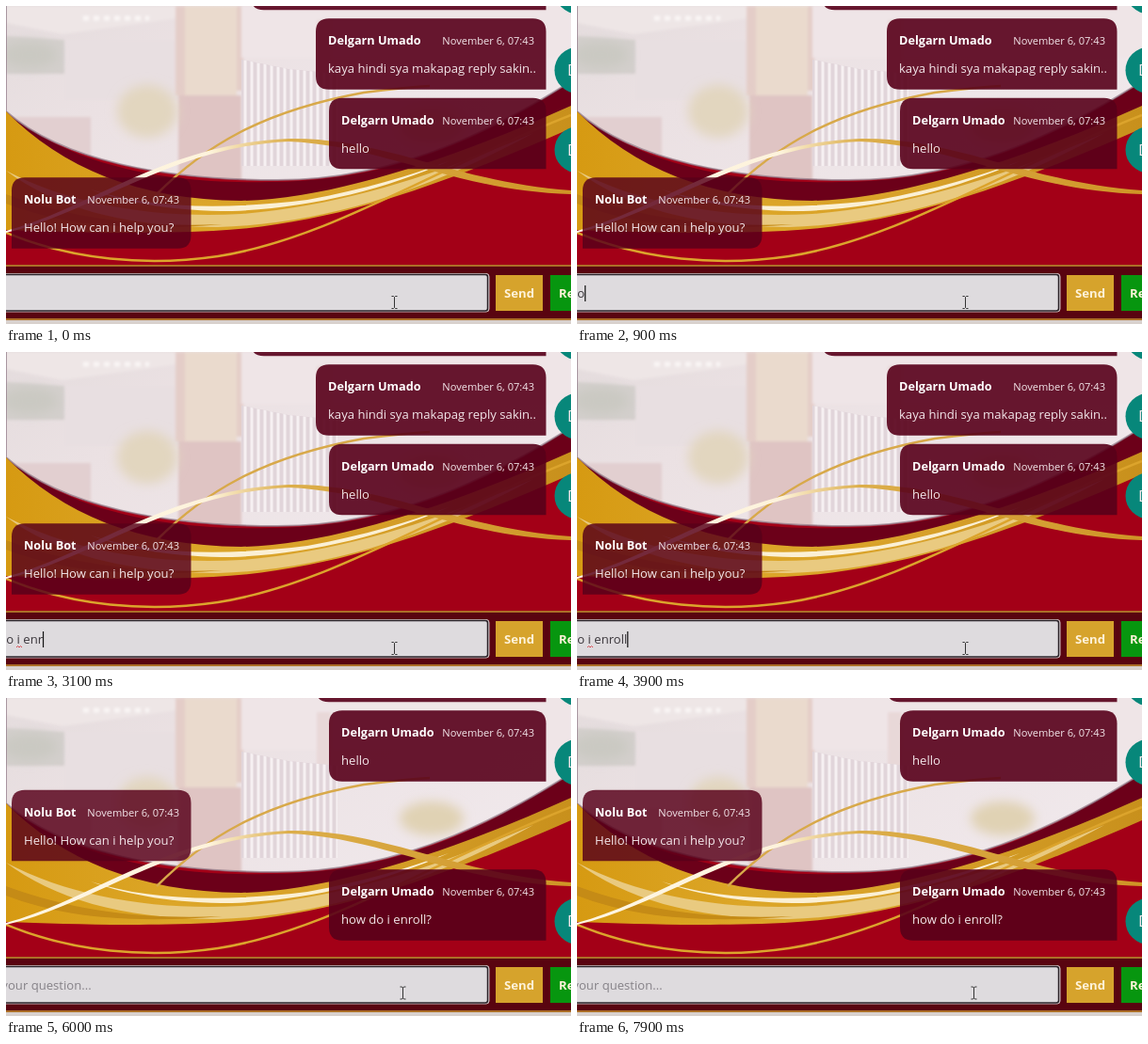
These frames come from a looping animation (600 px wide and 338 px high, 8 s). An HTML page:

```html
<!DOCTYPE html>
<html lang="en">
<head>
<meta charset="utf-8">
<title>Chat</title>
<style>
html, body { margin: 0; width: 100%; height: 100%; overflow: hidden; }
svg { display: block; width: 600px; height: 338px; }
text { font: 13.1px "Open Sans", "Noto Sans", sans-serif; white-space: pre; }
#chat text { fill: #f3e6ea; }
#chat .name { font-size: 12.7px; font-weight: 700; fill: #fff; }
#chat .date { font-size: 11.1px; text-anchor: end; }
.button { font-size: 13.2px; font-weight: 700; fill: #fff3da; }
</style>
</head>
<body>
<svg viewBox="0 0 600 338">
  <defs>
    <linearGradient id="sky" x2="1" y2=".5">
      <stop stop-color="#e4dcdd"/><stop offset=".35" stop-color="#ebe1e3"/><stop offset="1" stop-color="#f0e8eb"/>
    </linearGradient>
    <linearGradient id="gold" x2="1">
      <stop stop-color="#d69a12"/><stop offset=".3" stop-color="#dca628"/>
      <stop offset=".6" stop-color="#d8a12a"/><stop offset="1" stop-color="#c8901c"/>
    </linearGradient>
    <linearGradient id="ribbon" x2="1">
      <stop stop-color="#fff6e4"/><stop offset=".36" stop-color="#fdf3dc"/>
      <stop offset=".5" stop-color="#dcae4a"/><stop offset="1" stop-color="#cf9526"/>
    </linearGradient>
    <pattern id="bars" width="7" height="80" patternUnits="userSpaceOnUse">
      <path d="M2 0V80" stroke="#f6f0f2" stroke-width="3"/>
    </pattern>
    <clipPath id="bowl"><path id="edge" d="M0 -5H605V77C540 118 430 185 288 185C170 185 60 165 0 112Z"/></clipPath>
    <filter id="soft"><feGaussianBlur stdDeviation="1.5"/></filter>
    <filter id="leaf"><feGaussianBlur stdDeviation="6"/></filter>
  </defs>

  <rect width="600" height="338" fill="#a30017"/>
  <path d="M0 110C60 168 170 190 280 187C430 187 540 122 600 75V114C520 163 400 213 280 212C150 212 60 190 0 130Z" fill="#6c0019"/>

  <g clip-path="url(#bowl)">
    <rect width="600" height="200" fill="url(#sky)"/>
    <g filter="url(#soft)">
      <path d="M0 0H190V12L60 30L0 18Z" fill="#eee6e6"/>
      <path d="M82 13H152" stroke="#faf6f5" stroke-width="5" stroke-dasharray="6 5"/>
      <path d="M0 32L62 36V72H0Z" fill="#d3cfcc"/>
      <path d="M62 36H185V100H62Z" fill="#e8dfe1"/>
      <path d="M185 0H245V95H185Z" fill="#eadacd"/>
      <path d="M180 0H190V95H180ZM245 0H252V90H245Z" fill="#e4cdc8"/>
      <path d="M0 118H90V160H0Z" fill="#e2cfd0"/>
      <path d="M183 95H250V190H183Z" fill="#dfc4c3"/>
      <path d="M250 0H600V55H250Z" fill="#efe5e7"/>
      <path d="M330 15H345V130H330Z" fill="#e8d8d8"/>
    </g>
    <path id="gate" d="M250 57L300 67L352 72V170H250Z" fill="#e1d5da"/>
    <use href="#gate" style="fill:url(#bars)"/>
    <path d="M250 57L300 67L352 72V170H250Z" fill="url(#bars)"/>
    <g filter="url(#leaf)">
      <ellipse cx="25" cy="52" rx="30" ry="14" fill="#cac9c2"/>
      <ellipse cx="150" cy="112" rx="32" ry="28" fill="#e2d6bf"/>
      <ellipse cx="452" cy="128" rx="34" ry="18" fill="#e0d2b4"/>
    </g>
  </g>
  <use href="#edge" fill="none" stroke="#8f7887" stroke-width="2" opacity=".7"/>

  <path d="M0 112C60 172 140 206 250 207C350 205 480 160 600 106V130C480 182 360 232 220 239C130 243 60 240 0 238Z" fill="url(#gold)"/>
  <path d="M0 175C70 212 160 226 250 221C360 212 460 178 560 135C460 190 350 231 225 235C120 235 50 212 0 175Z" fill="#e9ca80"/>
  <path d="M0 200C80 229 150 235 230 232C130 240 60 233 0 210Z" fill="#c58b16"/>
  <path d="M90 195C150 215 230 217 320 206C380 195 430 180 470 165C400 196 320 215 240 218C180 218 130 210 90 195Z" fill="#fbf0d4"/>
  <g fill="none">
    <path d="M0 241C70 270 150 277 225 266C345 247 450 175 600 116" stroke="#dca42c" stroke-width="2.5"/>
    <path d="M160 200C210 150 270 112 380 92C410 88 430 86 450 85" stroke="#d8a94a" stroke-width="2.5"/>
  </g>
  <path d="M0 239C90 215 170 146 300 141C400 139 480 188 600 196V200C480 197 400 148 300 144C175 150 95 219 0 241Z" fill="url(#ribbon)"/>

  <g id="chat"></g>

  <rect y="275" width="600" height="63" fill="#590410"/>
  <path d="M0 276H600M0 333H600" stroke="#c8922f" stroke-width="1.6"/>
  <rect y="334" width="600" height="4" fill="#d8d1cd"/>
  <rect x="-50" y="284.5" width="563" height="40.500" rx="3" fill="#dedbde" stroke="#cdb9bb"/>
  <rect x="-50" y="285.5" width="561.5" height="38.500" rx="2.5" fill="#dedbde" stroke="#2a2228" stroke-width="1.5"/>
  <text id="entry" x="-37" y="310"></text>
  <path id="spell" d="M11 314l1.5 -1.5l1.5 1.5l1.5 -1.5l1.5 1.5" fill="none" stroke="#d8444c"/>
  <path id="caret" d="M0 297V314" stroke="#111" stroke-width="1.2"/>
  <rect x="520" y="286" width="50" height="38" fill="#d6a32c"/>
  <text class="button" x="529" y="310">Send</text>
  <rect x="578" y="286" width="30" height="38" fill="#07960f"/>
  <text class="button" x="587" y="310">Reset</text>
  <path id="pointer" d="M-3 -6.500H-1L0 -5.500L1 -6.500H3M0 -5.500V5.500M-3 6.500H-1L0 5.500L1 6.500H3" fill="none" stroke="#333"/>
</svg>

<script>
const LOOP = 8000, SENT = 4300, PITCH = 84.5;
const $ = id => document.getElementById(id);

// [left edge, text, written by bot]
const messages = [
  [260, "hindi ko pa alam kung ano ang nangyari"],
  [329, "kaya hindi sya makapag reply sakin.."],
  [343, "hello"],
  [6, "Hello! How can i help you?", true],
  [343, "how do i enroll?"]
];
// [time, key]; "<" deletes the last character
const keys = [
  [0, "ho"], [150, "w"], [350, " "], [500, "d"], [750, "o"], [1200, " "], [1450, "i"],
  [1750, " "], [2100, "n"], [2450, "<"], [2700, "e"], [2900, "n"], [3100, "r"],
  [3300, "o"], [3500, "l"], [3700, "l"], [4050, "?"]
];

function bubble([left, text, bot], i) {
  const right = bot ? 196.5 : 573.5, top = 13.3 + (i - 1) * PITCH, r = 14;
  const corner = (round, path, x, y) => round ? path : `L${x} ${y}`;
  const bottom = top + 75.500;
  const shape = `M${left + r} ${top}H${right - r}q${r} 0 ${r} ${r}V${bottom - r}`
    + corner(bot, `q0 ${r} ${-r} ${r}`, right, bottom)
    + `H${bot ? left : left + r}`
    + corner(!bot, `q${-r} 0 ${-r} ${-r}`, left, bottom)
    + `V${top + r}q0 ${-r} ${r} ${-r}Z`;
  const avatar = bot ? "" : `<circle cx="607" cy="${top + 55}" r="24.500" fill="#07877a"/>
    <text x="596" y="${top + 61}" style="font-size:17px">D</text>`;
  return `<g><path d="${shape}" fill="rgba(88,0,26,${bot ? 0.83 : 0.9})"/>${avatar}
    <text class="name" x="${left + 13}" y="${top + 28}">${bot ? "Nolu Bot" : "Delgarn Umado"}</text>
    <text class="date" x="${right - 12.5}" y="${top + 28}">November 6, 07:43</text>
    <text x="${left + 13}" y="${top + 58}">${text}</text></g>`;
}
$("chat").innerHTML = messages.map(bubble).join("");
const lastMessage = $("chat").lastElementChild;

function draw(t) {
  const sent = t >= SENT, entry = $("entry");
  let typed = "", since = 0;
  for (const [time, key] of keys) {
    if (time > t) break;
    typed = key === "<" ? typed.slice(0, -1) : typed + key;
    since = time;
  }
  entry.textContent = sent ? "Type your question..." : typed;
  entry.setAttribute("fill", sent ? "#858187" : "#3a363b");

  const blinkOn = (t - since) % 1060 < 530;
  $("caret").style.display = !sent && blinkOn ? "" : "none";
  $("caret").setAttribute("transform", `translate(${-36.5 + entry.getComputedTextLength()})`);
  $("spell").style.display = !sent && t >= 1750 ? "" : "none";

  lastMessage.style.display = sent ? "" : "none";
  $("chat").setAttribute("transform", `translate(0 ${sent ? -PITCH : 0})`);

  const k = Math.min(1, Math.max(0, (t - 5500) / 300)), ease = k * k * (3 - 2 * k);
  $("pointer").setAttribute("transform", `translate(${412.5 + 9 * ease} ${315 - 1.5 * ease})`);
}

function frame() {
  draw(performance.now() % LOOP);
  requestAnimationFrame(frame);
}
frame();
</script>
</body>
</html>
```
